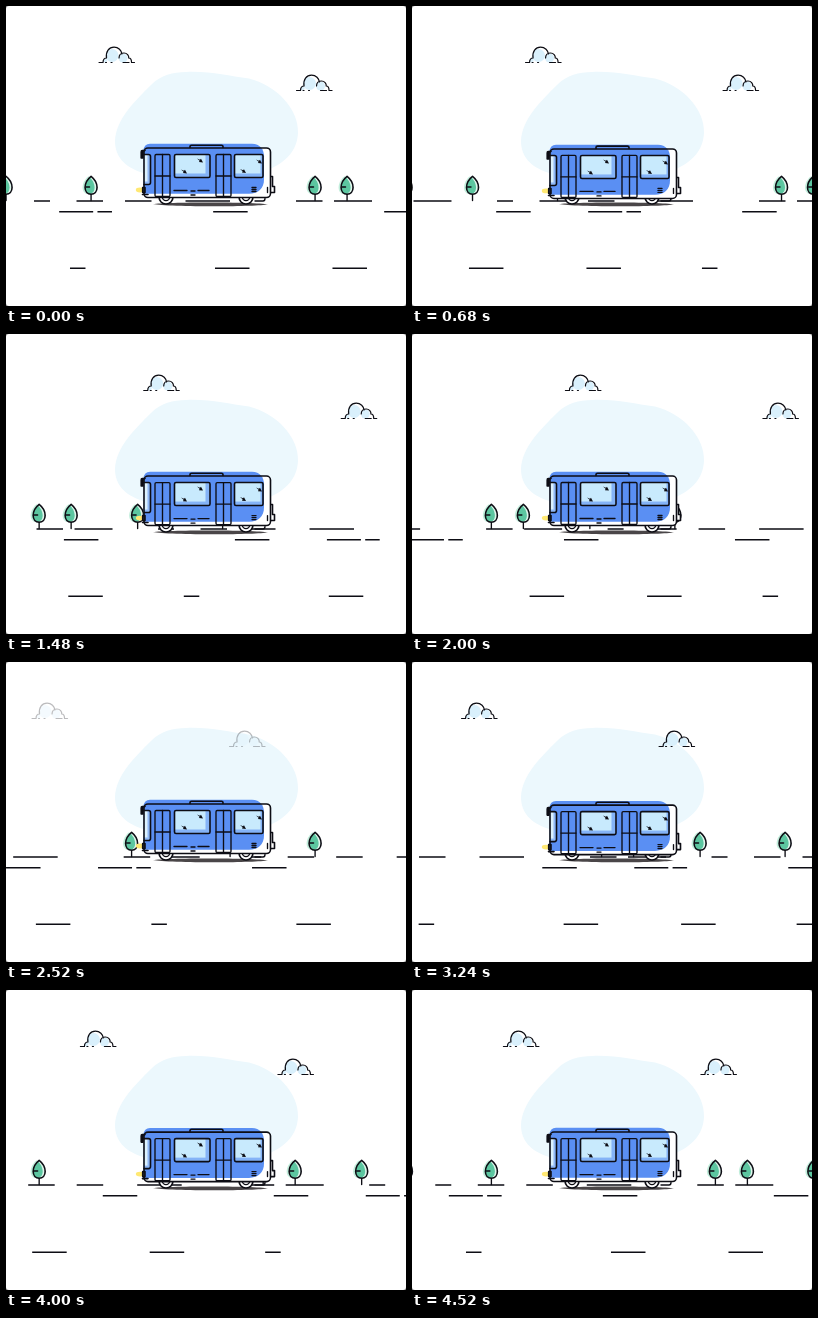
Write an HTML page that moves like this. It is 400 px wide and 300 px high and loops after 4560 ms.

```html
<!DOCTYPE html>
<html lang="en">
<head>
<meta charset="utf-8">
<title>Bus ride</title>
<style>
  html, body { margin: 0; width: 100%; height: 100%; overflow: hidden; background: #777; }
  svg { display: block; width: 100vw; height: 100vh; }
  .ink { fill: none; stroke: #0d0d14; stroke-width: 1.6; stroke-linecap: round; stroke-linejoin: round; }
  .road { stroke-width: 1.5; stroke-linecap: butt; }
  .thin { stroke-width: 1.35; }
</style>
</head>
<body>
<svg viewBox="0 0 400 300" xmlns="http://www.w3.org/2000/svg">
  <defs>
    <g id="cloud">
      <g fill="#d9f0fc">
        <circle cx="13" cy="-7" r="6.5"/>
        <circle cx="24" cy="-4.5" r="4.5"/>
        <circle cx="6" cy="-2" r="2"/>
      </g>
      <path class="ink" stroke-width="1.2" style="stroke-width:1.2" d="M0 0H4 M6.5 0H7.5 M12 0H13 M24 0H30 M32.5 0H35.5
        M4 0C4 -3 5.5 -4.5 7.5 -4.5C6.5 -11 10 -15.3 15 -15.3C19.5 -15.3 22.5 -12 22.8 -8.5
        M20 -4.5C20 -8 22.5 -9.5 25 -9.5C28 -9.5 30 -7 29.7 -4.5C31.5 -4.5 32.5 -3 32.5 0"/>
    </g>
    <path id="leaf" d="M0 170.3C3.5 173 6 177.5 6 181.5C6 185.5 3.5 188.2 0 188.2C-3.5 188.2 -6 185.5 -6 181.5C-6 177.5 -3.5 173 0 170.3Z"/>
    <clipPath id="inLeaf"><use href="#leaf"/></clipPath>
    <g id="tree">
      <use href="#leaf" x="-2.5" fill="#c2eedc"/>
      <use href="#leaf" fill="#dff6ec"/>
      <g clip-path="url(#inLeaf)"><use href="#leaf" x="-2.5" fill="#5cc6a0"/></g>
      <use href="#leaf" class="ink"/>
      <path class="ink thin" d="M0 194.5V188.5M-5 181H-1.5"/>
    </g>
    <path id="glint" d="M-3 -2L0 -.8L1 -1.8L3 2L-1 1.6L-.4 .3Z" fill="#0d0d14"/>
    <g id="door">
      <rect x="0" y="149" width="15" height="42" rx="1.2"/>
      <path d="M7.5 149V191M0 170.5H15"/>
    </g>
    <g id="wheel" class="ink">
      <circle r="7" cy="191" style="fill:#fff"/>
      <circle r="3.6" cy="191" class="thin"/>
    </g>
  </defs>

  <rect width="400" height="300" rx="3" fill="#fff"/>
  <path d="M180 66C205 65 222 70 243 72.5C270 79 293 103 292 127C291 145 280 156 262 164C225 180 165 180 137 167C118 161 109 150 109 135C110 113 129 95 145 79C155 69 167 66 180 66Z" fill="#ecf8fd"/>
  <g id="clouds">
    <use href="#cloud" y="56.5"/>
    <use href="#cloud" x="197.5" y="84.5"/>
  </g>
  <g id="scenery"></g>

  <path d="M147 198C160 195.8 250 195.8 262 198.3C250 201.2 160 200.8 147 198Z" fill="#4a4648"/>
  <use href="#wheel" x="160"/>
  <use href="#wheel" x="240"/>
  <path d="M249 195H257Q259 195 259 192.5" class="ink thin"/>

  <g id="bus">
    <ellipse cx="134" cy="184.5" rx="4.2" ry="2.4" fill="#ffe873"/>
    <path d="M263 171H266.5V181H268.5V187H263Z" class="ink" style="fill:#fff"/>
    <rect x="138" y="142.5" width="126.5" height="49.5" rx="4" fill="#fff"/>
    <path d="M144 138.3H246C254 138.3 258 144 258 151V174C258 183 252 188.3 243 188.3H137.5V145Q138 138.3 144 138.3Z" fill="#5a8ff3"/>
    <path d="M137.5 149H142.5Q144.5 149 144.5 151V177Q144.5 179 142.5 179H137.5Z" fill="#8fb8f8"/>
    <path d="M137.5 149H141.5V176H137.5Z" fill="#dcf1fd"/>
    <g fill="#84b3f7">
      <rect x="168.5" y="149" width="35.5" height="23" rx="1.5"/>
      <rect x="228.5" y="149" width="28.5" height="23" rx="1.5"/>
    </g>
    <g fill="#c8eafd">
      <rect x="168.5" y="149" width="31" height="19"/>
      <rect x="228.5" y="149" width="26" height="19"/>
    </g>
    <g class="ink">
      <path d="M184 142V141Q184 139.7 185.5 139.7H215.5Q217 139.7 217 141V142"/>
      <rect x="138" y="142.5" width="126.5" height="49.5" rx="4"/>
      <path d="M138 149H142.5Q144.5 149 144.5 151V177Q144.5 179 142.5 179H138"/>
      <path d="M139 145H136.2Q135.2 145 135.2 146.5V152.5H137V147" fill="#0d0d14"/>
      <path d="M136.5 189H142M136.7 182H139V187H136.7Z"/>
      <rect x="168.5" y="149" width="35.5" height="23" rx="1.5"/>
      <rect x="228.5" y="149" width="28.5" height="23" rx="1.5"/>
      <path class="thin" d="M168 185H181M185 185.5H189M185 189.5H189M192 185H203M246 182H250M246 184H250M246 186H250M261.5 182V187"/>
      <g class="thin"><use href="#door" x="149"/><use href="#door" x="210"/></g>
    </g>
    <use href="#glint" x="194" y="155"/>
    <use href="#glint" x="178" y="166"/>
    <use href="#glint" x="253" y="156"/>
    <use href="#glint" x="237" y="165.5"/>
  </g>
</svg>
<script>
const LOOP = 4560;
const LEAD = 11; // the scenery runs slightly ahead of the clock
const $ = id => document.getElementById(id);

const dashes = (y, list) =>
  `<path class="ink road" d="${list.map(([x, w]) => `M${x} ${y}h${w}`).join('')}"/>`;

// Each layer repeats every `period` px and moves right at `speed` px/ms.
const layers = [
  { period: 383.5, speed: 0.0838,
    art: dashes(195, [[27, 16], [69.5, 26.5], [118, 26.5], [178.5, 44.5], [289, 26.5], [327, 38]]) },
  { period: 417, speed: 0.1809,
    art: dashes(205.8, [[51, 34], [89.3, 14.5], [205, 34.5], [376, 34.5]]) },
  { period: 378, speed: 0.3323,
    art: dashes(262.3, [[60, 15.5], [205, 34.5], [322.5, 34.5]]) },
  { period: 407.5, speed: 0.0889,
    art: [-1, 84, 308, 340].map(x => `<use href="#tree" x="${x}"/>`).join('') }
];

$('scenery').innerHTML = layers.map(l =>
  `<g><g>${l.art}</g><g transform="translate(${-l.period} 0)">${l.art}</g></g>`).join('');
layers.forEach((l, i) => l.node = $('scenery').children[i]);

const clamp = v => Math.max(0, Math.min(1, v));
const shift = (node, x, y) => node.setAttribute('transform', `translate(${x.toFixed(3)} ${y.toFixed(3)})`);

function draw(t) {
  for (const l of layers) shift(l.node, ((t + LEAD) * l.speed) % l.period, 0);

  // The clouds fade out, jump back to the left and fade in again.
  const back = t >= 2400;
  shift($('clouds'), back ? 26 + 0.0327 * (t - 2520) : 93 + 0.0302 * t, 0);
  $('clouds').setAttribute('opacity', back ? clamp((t - 2400) / 440) : clamp((2400 - t) / 400));

  shift($('bus'), 0, 0.1 - 0.6 * Math.cos(t / LOOP * 18 * Math.PI));
}

const start = performance.now();
function tick() {
  draw((performance.now() - start) % LOOP);
  requestAnimationFrame(tick);
}
draw(0);
requestAnimationFrame(tick);
</script>
</body>
</html>
```
